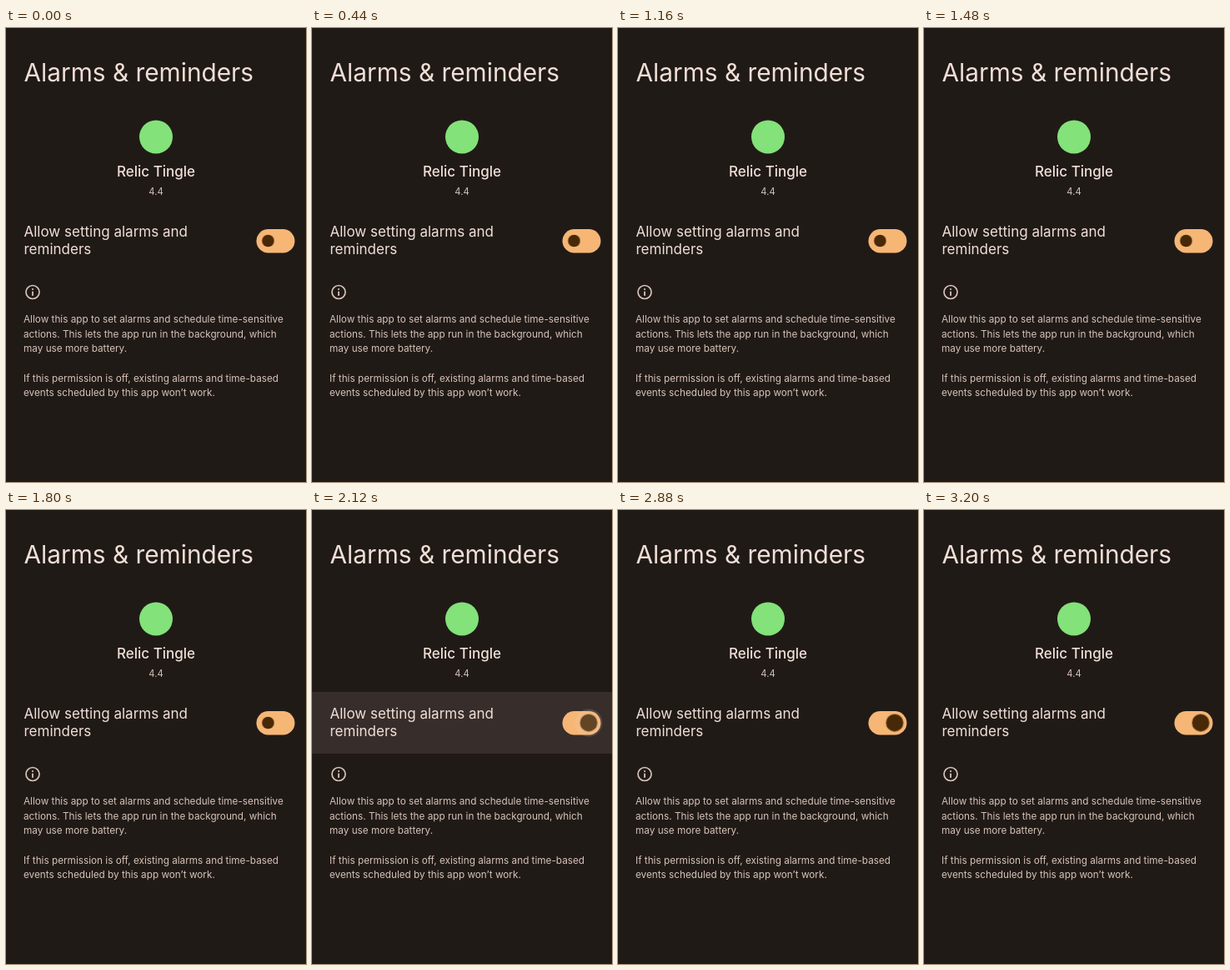
An HTML page that plays this animation: 360 by 544 pixels, repeating every 3240 ms.

```html
<!DOCTYPE html>
<html lang="en">
<head>
<meta charset="utf-8">
<title>Alarms &amp; reminders</title>
<style>
  html, body { margin: 0; width: 100%; height: 100%; overflow: hidden; background: #201a17; }
  svg { display: block; width: 360px; height: 544px; font-family: Inter, Roboto, sans-serif; fill: #f0dfd6; }
  .title { font-size: 29.8px; }
  .name { font-size: 17px; font-weight: 500; }
  .label { font-size: 17px; }
  .note, .version { font-size: 11.75px; fill: #d7c3b7; }
  .version { font-size: 11.2px; }
  .mid { text-anchor: middle; }
  #row, #halo { opacity: 0; }
  #knob, #halo { transform: translate(314.5px, 255px); }
</style>
</head>
<body>
<svg viewBox="0 0 360 544">
  <rect width="360" height="544" fill="#201a17"/>
  <rect id="row" y="218" width="360" height="74" fill="#382e2b"/>

  <text class="title" x="21.5" y="64">Alarms &amp; reminders</text>

  <circle cx="180" cy="130.5" r="20" fill="#83e279"/>
  <text class="name mid" x="180" y="178">Relic Tingle</text>
  <text class="version mid" x="180" y="200">4.4</text>

  <text class="label" x="21.5" y="250">Allow setting alarms and</text>
  <text class="label" x="21.5" y="271">reminders</text>

  <rect x="300.5" y="241" width="46" height="28.5" rx="14.25" fill="#f6b675"/>
  <circle id="knob" r="7.3" fill="#482907"/>
  <circle id="halo" r="16.5" fill="#f0d9c8"/>

  <g fill="#d7c3b7">
    <circle cx="32" cy="316.5" r="8" fill="none" stroke="#d7c3b7" stroke-width="1.7"/>
    <rect x="31.1" y="315.6" width="1.8" height="5.2"/>
    <rect x="31.1" y="312.1" width="1.8" height="1.8"/>
  </g>
  <g id="notes" class="note"></g>
</svg>
<script>
  const LOOP = 3240;
  const $ = id => document.getElementById(id);

  const lines = [
    'Allow this app to set alarms and schedule time-sensitive',
    'actions. This lets the app run in the background, which',
    'may use more battery.',
    '',
    'If this permission is off, existing alarms and time-based',
    'events scheduled by this app won’t work.'
  ];
  lines.forEach((line, i) => {
    const text = document.createElementNS('http://www.w3.org/2000/svg', 'text');
    text.setAttribute('x', 21);
    text.setAttribute('y', 353 + i * 17.65);
    text.textContent = line;
    $('notes').append(text);
  });

  // Steps are [time in ms, value, easing to the next step].
  function play(id, prop, steps) {
    const frames = steps.map(([ms, value, easing = 'linear']) =>
      ({ offset: ms / LOOP, [prop]: value, easing }));
    $(id).animate(frames, { duration: LOOP, iterations: Infinity });
  }

  const at = (x, scale) => `translate(${x}px, 255px) scale(${scale})`;
  const slide = 'cubic-bezier(.4, 0, .2, 1)';

  play('row', 'opacity', [[0, 0], [1840, 0], [1960, 1], [2120, 1], [2240, 0], [LOOP, 0]]);
  play('halo', 'opacity', [[0, 0], [1840, 0], [1960, .16], [2120, .16], [2240, 0], [LOOP, 0]]);
  play('knob', 'transform', [[0, at(314.5, 1)], [1880, at(314.5, 1), slide], [2080, at(332, 1.43)], [LOOP, at(332, 1.43)]]);
  play('halo', 'transform', [[0, at(314.5, 1)], [1880, at(314.5, 1), slide], [2080, at(332, 1)], [LOOP, at(332, 1)]]);
</script>
</body>
</html>
```
